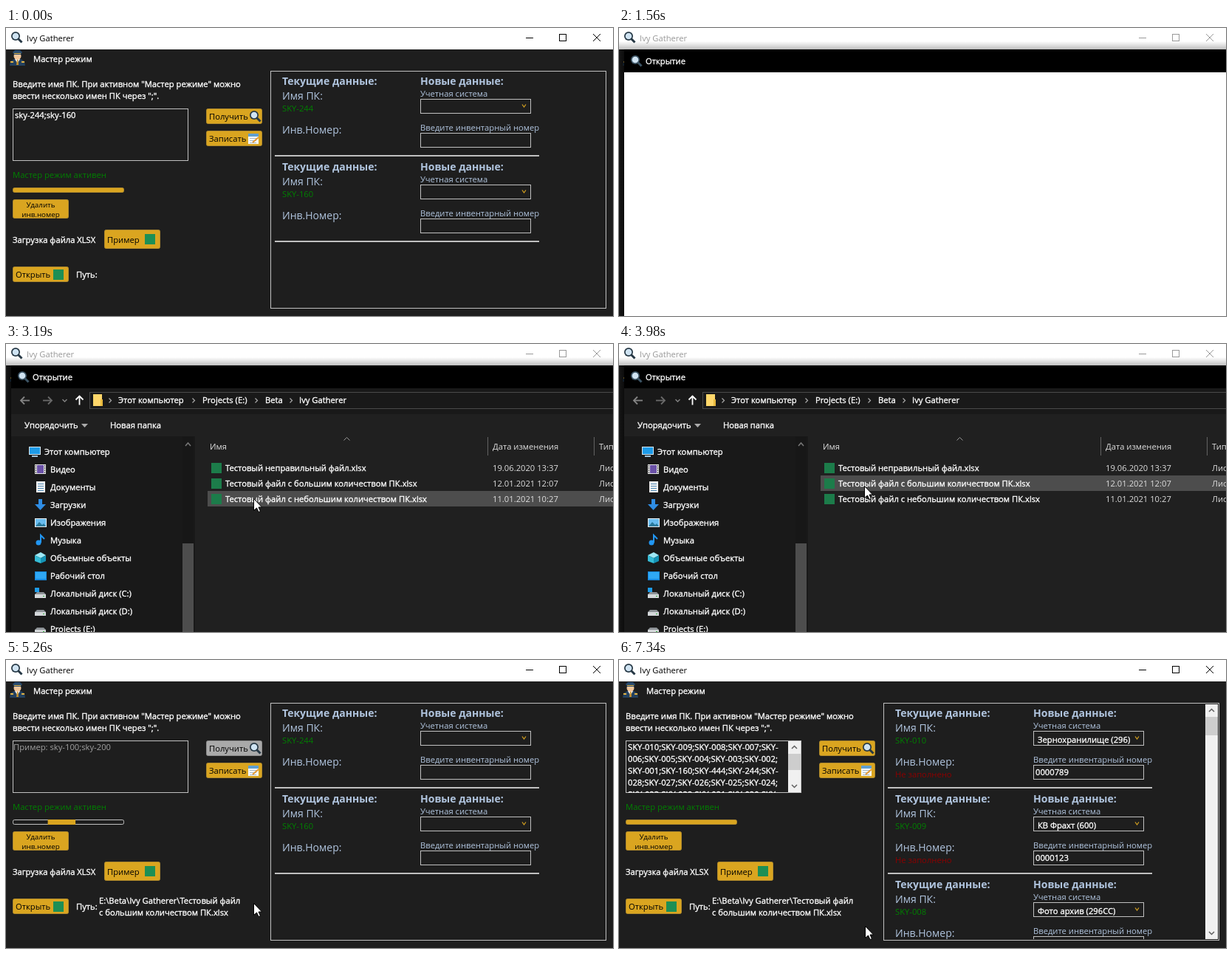
Animation, 822 px wide and 390 px high, one loop 8000 ms. Source, as an HTML page with a canvas:

```html
<!DOCTYPE html>
<html lang="ru">
<head>
<meta charset="utf-8">
<title>Ivy Gatherer</title>
<style>
html, body { margin: 0; width: 100%; height: 100%; overflow: hidden; background: #1e1e1e; }
canvas { display: block; }
</style>
</head>
<body>
<canvas id="stage" width="822" height="390"></canvas>
<script>
const ctx = document.getElementById('stage').getContext('2d');
const LOOP = 8000;
const APP = 'Ivy Gatherer';
const WHITE = '#fff', GOLD = '#daa520', GOLD_EDGE = '#b08a2c', STEEL = '#b0c4de';
const GREEN = '#008000', EDGE = '#c0c0c0', SHEET = '#1d8f55';

const T = {
  blur: 1160, dialog: 1410, solid: 1560, frame: 1650, files: 1710,
  close: 4230, path: 4410, loaded: 7160
};

// Keys are [time, x, y]; the pointer is hidden between the two tracks.
const pointerIn = [[310, 112, 389], [480, 82, 362], [640, 42, 336], [760, 29, 328]];
const pointer = [
  [2420, 811, 281], [2560, 640, 262], [2720, 440, 222], [2830, 350, 207], [2930, 323, 201],
  [3080, 323, 201], [3190, 335, 209], [3460, 335, 209], [3470, 335, 208],
  [3800, 335, 208], [4010, 331, 189], [4590, 331, 189], [4800, 331, 215], [5050, 333, 280],
  [5260, 335, 329], [5330, 338, 350], [5380, 337, 356], [5500, 333, 360]
];
const barKeys = [[4410, -38], [4590, -37.5], [5260, 47], [5410, 62], [6130, 150],
  [6340, 150], [6350, -37.5], [7130, 88]];

function along(keys, t) {
  if (t <= keys[0][0]) return keys[0].slice(1);
  for (let i = 1; i < keys.length; i++) {
    const a = keys[i - 1], b = keys[i];
    if (t < b[0]) {
      const k = (t - a[0]) / (b[0] - a[0]);
      return a.slice(1).map((v, j) => v + (b[j + 1] - v) * k);
    }
  }
  return keys[keys.length - 1].slice(1);
}

function rect(x, y, w, h, color) {
  ctx.fillStyle = color;
  ctx.fillRect(x, y, w, h);
}
function frame(x, y, w, h, color) {
  ctx.strokeStyle = color;
  ctx.lineWidth = 1;
  ctx.strokeRect(x + .5, y + .5, w - 1, h - 1);
}
function pill(x, y, w, h, fill, edge) {
  ctx.beginPath();
  ctx.roundRect(x + .5, y + .5, w - 1, h - 1, 2);
  ctx.fillStyle = fill;
  ctx.fill();
  ctx.strokeStyle = edge;
  ctx.lineWidth = 1;
  ctx.stroke();
}
function line(points, color, width = 1) {
  ctx.strokeStyle = color;
  ctx.lineWidth = width;
  ctx.beginPath();
  points.forEach(([x, y]) => ctx.lineTo(x, y));
  ctx.stroke();
}
function shape(points, color) {
  ctx.fillStyle = color;
  ctx.beginPath();
  points.forEach(([x, y]) => ctx.lineTo(x, y));
  ctx.fill();
}
function disc(x, y, r, color) {
  ctx.fillStyle = color;
  ctx.beginPath();
  ctx.arc(x, y, r, 0, 7);
  ctx.fill();
}
function text(s, x, y, color = WHITE, size = 12, bold = false, align = 'left') {
  ctx.font = `${bold ? 'bold ' : ''}${size * .935}px "Open Sans", "Noto Sans", sans-serif`;
  ctx.textAlign = align;
  ctx.fillStyle = color;
  ctx.fillText(s, x, y);
  if (color === WHITE) {
    // White text on dark is rendered a little heavier.
    ctx.strokeStyle = color;
    ctx.lineWidth = .35;
    ctx.strokeText(s, x, y);
  }
}
function clip(x, y, w, h, draw) {
  ctx.save();
  ctx.beginPath();
  ctx.rect(x, y, w, h);
  ctx.clip();
  draw();
  ctx.restore();
}

function lens(x, y, rim = '#263845') {
  line([[x + 9, y + 9], [x + 14.5, y + 14.5]], rim, 3);
  disc(x + 6, y + 6, 6, rim);
  disc(x + 6, y + 6, 4.3, '#cfe3f2');
}
function officer() {
  shape([[5, 51], [6, 45], [11, 42], [20, 42], [25, 45], [26, 51]], '#24415f');
  shape([[12, 42], [19, 42], [15.5, 48]], '#f4f4f4');
  shape([[15, 43], [16.5, 43], [17, 50], [14, 50]], '#c9922b');
  rect(6, 45, 4, 2, '#e0b040');
  rect(21, 45, 4, 2, '#e0b040');
  disc(15.5, 38, 5, '#f2c79c');
  shape([[9, 33], [12, 30], [19, 30], [22, 33], [20, 36], [11, 36]], '#27496d');
  rect(11, 34, 9, 1, '#e0b040');
}
function notepad(x, y) {
  rect(x, y, 14, 14, '#f5f8fa');
  rect(x, y, 14, 4, '#5f9fd0');
  for (let i = 0; i < 3; i++) rect(x + 2, y + 6 + i * 3, 9, 1, '#a9b8c4');
  line([[x + 6, y + 12], [x + 14, y + 5]], '#e79b32', 2);
}

function titleBar(active) {
  const ink = active ? '#000' : '#999';
  rect(0, 0, 822, 29, WHITE);
  lens(7, 5);
  text(APP, 28, 18, ink);
  line([[704, 13.5], [714, 13.5]], ink);
  frame(749, 8, 10, 10, ink);
  line([[795, 8], [805, 18]], ink);
  line([[805, 8], [795, 18]], ink);
}

function button(label, x, y, w, h, enabled = true) {
  pill(x, y, w, h, enabled ? GOLD : '#a9a9a9', enabled ? GOLD_EDGE : '#8c8c8c');
  text(label, x + 4, y + h / 2 + 4.5, '#000');
}

function scrollbar(x, y, h, thumbY, thumbH) {
  rect(x, y, 17, h, '#f0f0f0');
  rect(x, thumbY, 17, thumbH, '#cdcdcd');
  const cx = x + 8.5, end = y + h;
  line([[cx - 3.5, y + 10], [cx, y + 6.5], [cx + 3.5, y + 10]], '#606060', 1.5);
  line([[cx - 3.5, end - 10], [cx, end - 6.5], [cx + 3.5, end - 10]], '#606060', 1.5);
}

function card(y, [name, system, number]) {
  text('Текущие данные:', 374, y + 19, STEEL, 15, true);
  text('Новые данные:', 561, y + 19, STEEL, 15, true);
  text('Имя ПК:', 374, y + 39, STEEL, 15);
  text(name, 374, y + 55, GREEN);
  text('Инв.Номер:', 374, y + 85, STEEL, 15);
  text('Учетная система', 561, y + 35, STEEL);
  frame(561, y + 38, 150, 20, EDGE);
  line([[699, y + 45.5], [701.5, y + 49], [704, y + 45.5]], GOLD, 1.2);
  text('Введите инвентарный номер', 561, y + 81, STEEL);
  frame(561, y + 84, 150, 20, EDGE);
  if (system) {
    text('Не заполнено', 374, y + 101, '#8b0000');
    text(system, 567, y + 54);
    text(number, 564, y + 98);
  }
  rect(364, y + 114, 358, 2, EDGE);
}

const firstCards = [['SKY-244'], ['SKY-160']];
const loadedCards = [
  ['SKY-010', 'Зернохранилище (296)', '0000789'],
  ['SKY-009', 'КВ Фрахт (600)', '0000123'],
  ['SKY-008', 'Фото архив (296СС)', '']
];
const nameLines = [
  'SKY-010;SKY-009;SKY-008;SKY-007;SKY-',
  '006;SKY-005;SKY-004;SKY-003;SKY-002;',
  'SKY-001;SKY-160;SKY-444;SKY-244;SKY-',
  '028;SKY-027;SKY-026;SKY-025;SKY-024;',
  'SKY-023;SKY-022;SKY-021;SKY-020;SKY-'
];

function nameBox(t) {
  frame(9, 109, 238, 71, EDGE);
  if (t < T.close) text('sky-244;sky-160', 12, 122);
  else if (t < T.loaded) text('Пример: sky-100;sky-200', 10, 122, '#a0a0a0');
  else {
    clip(10, 110, 219, 70, () => nameLines.forEach((s, i) => text(s, 12, 122 + i * 16)));
    scrollbar(229, 110, 69, 127, 22);
  }
}

function progress(t) {
  if (t < T.path || t >= T.loaded) return pill(9, 216, 151, 7, GOLD, GOLD_EDGE);
  pill(9, 216, 151, 7, '#1e1e1e', EDGE);
  const [x] = along(barKeys, t);
  clip(10, 216, 149, 7, () => rect(9.5 + x, 216, 37.5, 7, GOLD));
}

function mainWindow(t) {
  const loaded = t >= T.loaded;
  rect(0, 29, 822, 361, '#1e1e1e');
  titleBar(t < T.blur || t >= T.close);
  officer();
  text('Мастер режим', 37, 46);
  text('Введите имя ПК. При активном "Мастер режиме" можно', 9, 80);
  text('ввести несколько имен ПК через ";".', 9, 96);
  nameBox(t);
  button('Получить', 271, 109, 76, 21, t < T.close || loaded);
  lens(330, 112);
  button('Записать', 271, 139, 76, 21);
  notepad(328, 143);
  text('Мастер режим активен', 9, 203, GREEN);
  progress(t);
  pill(9, 232, 76, 26, GOLD, GOLD_EDGE);
  text('Удалить', 47, 243, '#000', 10.5, false, 'center');
  text('инв.номер', 47, 256, '#000', 10.5, false, 'center');
  text('Загрузка файла XLSX', 9, 291);
  button('Пример', 133, 273, 76, 26);
  rect(188, 279, 14, 14, SHEET);
  button('Открыть', 9, 323, 76, 21);
  rect(64, 327, 14, 14, SHEET);
  text('Путь:', 95, 338);
  if (t >= T.path) {
    text(`E:\\Beta\\${APP}\\Тестовый файл`, 126, 330);
    text('с большим количеством ПК.xlsx', 126, 346);
  }
  clip(359, 59, 453, 319, () =>
    (loaded ? loadedCards : firstCards).forEach((c, i) => card(58 + i * 116, c)));
  frame(358, 58, 455, 322, EDGE);
  if (loaded) scrollbar(794, 60, 318, 77, 25);
}

function arrow(x, y, dx, dy, color) {
  const tip = [x + dx * 6, y + dy * 6];
  line([[x - dx * 6, y - dy * 6], tip], color, 1.8);
  line([[x + dx - dy * 5, y + dy - dx * 5], tip, [x + dx + dy * 5, y + dy + dx * 5]], color, 1.8);
}

const places = [
  ['Этот компьютер', 'screen'], ['Видео', 'film'], ['Документы', 'page'], ['Загрузки', 'down'],
  ['Изображения', 'image'], ['Музыка', 'note'], ['Объемные объекты', 'cube'],
  ['Рабочий стол', 'desk'], ['Локальный диск (C:)', 'system'],
  ['Локальный диск (D:)', 'disk'], ['Projects (E:)', 'disk']
];
const icons = {
  screen(x, y) {
    rect(x, y + 1, 16, 11, '#d5e6f0');
    rect(x + 1, y + 2, 14, 9, '#1e9be8');
    rect(x + 4, y + 13, 8, 2, '#9fc4dc');
  },
  film(x, y) {
    rect(x, y + 1, 15, 13, '#e4e4e4');
    rect(x + 3, y + 2, 9, 11, '#6b52a8');
    for (let i = 0; i < 4; i++) {
      rect(x + 1, y + 2 + i * 3, 1, 2, '#444');
      rect(x + 13, y + 2 + i * 3, 1, 2, '#444');
    }
  },
  page(x, y) {
    rect(x + 2, y, 12, 15, '#f2f2f2');
    for (let i = 0; i < 4; i++) rect(x + 4, y + 3 + i * 3, 8, 1, '#4d88b5');
  },
  down(x, y) {
    shape([[x + 5, y], [x + 10, y], [x + 10, y + 7], [x + 15, y + 7],
      [x + 7.5, y + 15], [x, y + 7], [x + 5, y + 7]], '#2f8de4');
  },
  image(x, y) {
    rect(x, y + 2, 16, 12, '#e8eef2');
    rect(x + 1, y + 3, 14, 10, '#69bdf0');
    shape([[x + 1, y + 13], [x + 6, y + 7], [x + 10, y + 11], [x + 12, y + 9], [x + 15, y + 13]], '#2a7a9c');
  },
  note(x, y) {
    disc(x + 5, y + 11, 3.5, '#2196f3');
    line([[x + 8, y + 11], [x + 8, y + 1], [x + 13, y + 6]], '#2196f3', 2);
  },
  cube(x, y) {
    shape([[x, y + 4], [x + 8, y], [x + 15, y + 4], [x + 8, y + 8]], '#9ee8f5');
    shape([[x, y + 4], [x + 8, y + 8], [x + 8, y + 15], [x, y + 12]], '#35bcd6');
    shape([[x + 15, y + 4], [x + 8, y + 8], [x + 8, y + 15], [x + 15, y + 12]], '#1593b5');
  },
  desk(x, y) {
    rect(x, y + 2, 16, 12, '#1689e0');
    rect(x + 1, y + 3, 14, 9, '#2fa8f5');
  },
  disk(x, y) {
    shape([[x + 3, y + 6], [x + 12, y + 6], [x + 15, y + 9], [x, y + 9]], '#8d9296');
    rect(x, y + 9, 15, 5, '#d4d8da');
    rect(x + 11, y + 11, 2, 1, '#2fae3b');
  },
  system(x, y) {
    icons.disk(x, y);
    rect(x, y, 6, 6, '#1e9be8');
  }
};

function sidebar() {
  rect(7, 125, 249, 265, '#191919');
  places.forEach(([label, icon], i) => {
    const y = 150 + i * 24;
    icons[icon](i ? 39 : 31, y - 12);
    text(label, i ? 60 : 52, y);
  });
  rect(239, 125, 15, 265, '#171717');
  rect(239, 270, 15, 120, '#4d4d4d');
  line([[243, 138], [246.5, 134], [250, 138]], '#777', 1.5);
}

const files = [
  ['Тестовый неправильный файл.xlsx', '19.06.2020 13:37'],
  ['Тестовый файл с большим количеством ПК.xlsx', '12.01.2021 12:07'],
  ['Тестовый файл с небольшим количеством ПК.xlsx', '11.01.2021 10:27']
];

function fileList(tip) {
  text('Имя', 276, 143, '#dedede');
  text('Дата изменения', 659, 143, '#dedede');
  text('Тип', 803, 143, '#dedede');
  line([[457.5, 130.5], [461.5, 126.5], [465.5, 130.5]], '#9a9a9a');
  rect(652, 126, 1, 25, '#636363');
  rect(796, 126, 1, 25, '#636363');
  files.forEach(([name, date], i) => {
    const top = 157 + i * 21;
    if (tip && tip[0] < 800 && tip[1] >= top && tip[1] < top + 21) rect(273, top, 549, 21, '#4d4d4d');
    rect(278, top + 4, 14, 14, '#1c7c4a');
    text(name, 297, top + 15);
    text(date, 659, top + 15, '#dedede');
    text('Лист', 803, top + 15, '#dedede');
  });
}

function dialog(t, tip) {
  ctx.save();
  ctx.globalAlpha = Math.min(1, .3 + .7 * (t - T.dialog) / (T.solid - T.dialog));
  const top = ctx.createLinearGradient(0, 18, 0, 29);
  top.addColorStop(0, 'rgba(0,0,0,0)');
  top.addColorStop(1, 'rgba(0,0,0,.25)');
  rect(0, 18, 822, 11, top);
  const side = ctx.createLinearGradient(0, 0, 7, 0);
  side.addColorStop(0, 'rgba(0,0,0,.25)');
  side.addColorStop(1, 'rgba(0,0,0,.6)');
  rect(0, 29, 7, 361, side);
  rect(7, 29, 815, 31, '#000');
  lens(16, 37, '#3d5566');
  text('Открытие', 36, 49);
  if (t < T.frame) {
    rect(7, 60, 815, 330, WHITE);
    ctx.restore();
    return;
  }
  rect(7, 60, 815, 35, '#191919');
  rect(7, 95, 815, 295, '#202020');
  arrow(26, 76.5, -1, 0, '#858585');
  arrow(56, 76.5, 1, 0, '#6a6a6a');
  line([[76.5, 75], [79.5, 78], [82.5, 75]], '#858585', 1.4);
  arrow(99.5, 76.5, 0, -1, WHITE);
  frame(113, 65, 720, 23, '#4a4a4a');
  rect(118, 68, 12, 16, '#ffd76a');
  rect(128, 75, 3, 9, '#e8b93f');
  [141, 254, 339, 386].forEach(x =>
    line([[x - 1.5, 73.5], [x + 1.5, 76.5], [x - 1.5, 79.5]], '#aaa', 1.2));
  text('Этот компьютер', 152, 80);
  text('Projects (E:)', 266, 80);
  text('Beta', 351, 80);
  text(APP, 397, 80);
  text('Упорядочить', 25, 114);
  shape([[102, 108], [111, 108], [106.5, 113]], '#aaa');
  text('Новая папка', 141, 114);
  sidebar();
  if (t >= T.files) fileList(tip);
  ctx.restore();
}

function pointerAt(t) {
  if (t >= 310 && t < 1220) return along(pointerIn, t);
  return t >= 2420 ? along(pointer, t) : null;
}
function drawPointer([px, py]) {
  ctx.save();
  ctx.translate(Math.round(px) + .5, Math.round(py) + .5);
  ctx.beginPath();
  [[0, 0], [0, 16], [4, 12.5], [6.5, 18], [9, 17], [6.5, 11.5], [11, 11.5]]
    .forEach(([x, y]) => ctx.lineTo(x, y));
  ctx.closePath();
  ctx.fillStyle = WHITE;
  ctx.fill();
  ctx.strokeStyle = '#000';
  ctx.lineWidth = 1;
  ctx.stroke();
  ctx.restore();
}

function draw(now) {
  const t = now % LOOP;
  const tip = pointerAt(t);
  mainWindow(t);
  if (t >= T.dialog && t < T.close) dialog(t, tip);
  if (tip) drawPointer(tip);
}

const start = performance.now();
function tick() {
  draw(performance.now() - start);
  requestAnimationFrame(tick);
}
tick();
</script>
</body>
</html>
```
